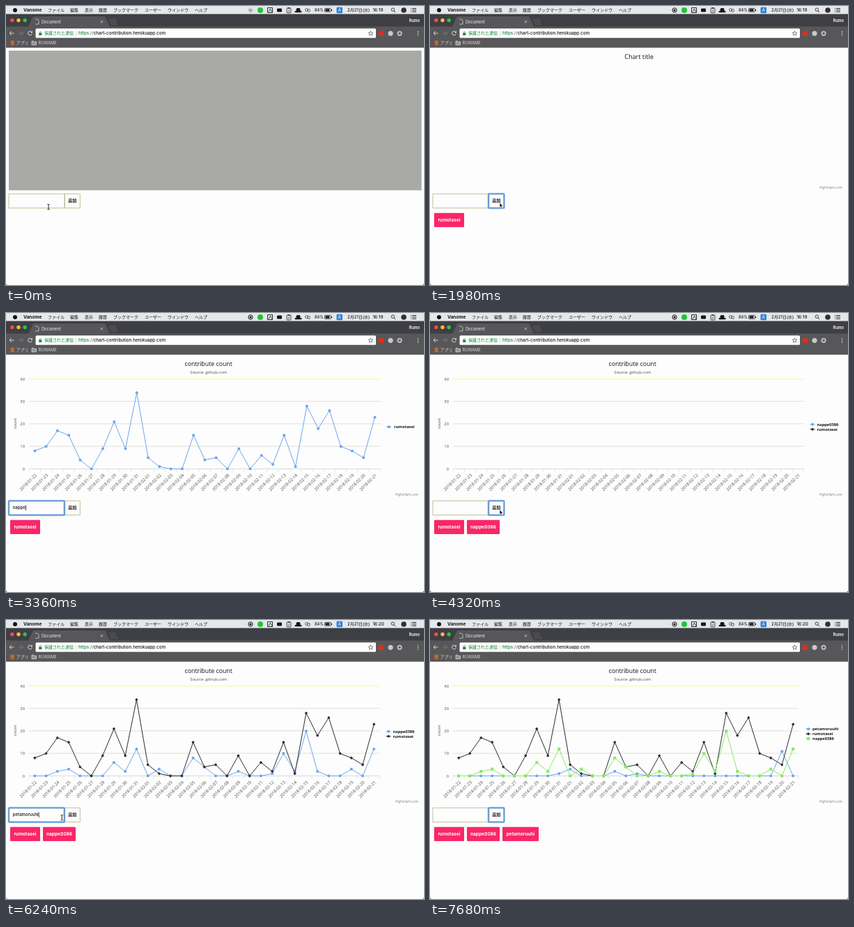
An HTML page with a canvas that plays this animation: 600x400 px, repeating every 7740 ms.

```html
<!DOCTYPE html>
<html lang="ja">
<head>
<meta charset="utf-8">
<title>Document</title>
<style>
html, body { margin: 0; width: 100%; height: 100%; overflow: hidden; background: #fdfdfd; }
canvas { display: block; width: 600px; height: 400px; }
</style>
</head>
<body>
<canvas id="stage" width="600" height="400"></canvas>
<script>
const c = document.getElementById('stage').getContext('2d');
const LOOP = 7740;
const UI = 'Inter, "Noto Sans CJK JP", "Noto Sans CJK", sans-serif';
const PLOT = '"Open Sans", "Noto Sans", sans-serif';
const INK = '#141416', SOFT = '#4a4a42', PAGE = '#fdfdfd', STRIP = '#3e3e45', BAR = '#57575a', PALE = '#e2e2e2';
const EDGE = '#b9b98c';

const users = {
  a: { name: 'rumotasei', data: [8,10,17,15,4,0,9,21,9,34,5,1,0,0,15,4,5,0,9,0,6,2,15,1,28,18,26,10,8,5,23] },
  b: { name: 'nappe0386', data: [0,0,2,3,0,0,0,6,2,12,0,3,0,0,8,4,0,0,2,0,0,1,10,2,20,2,0,0,3,0,12] },
  c: { name: 'petamoruuhi', data: Array.from({ length: 31 }, (_, i) => ({ 9: 1, 10: 3, 14: 2, 16: 1, 29: 11 })[i] || 0) }
};
const tags = [
  { user: 'a', at: 1860, x: 6, w: 43 },
  { user: 'b', at: 4080, x: 53, w: 47 },
  { user: 'c', at: 6420, x: 104, w: 52 }
];
const charts = [
  { at: 2400, order: 'a', step: 16.27, key: 549.5, label: 557 },
  { at: 4300, order: 'ba', step: 16.23, key: 549, label: 555.5 },
  { at: 6808, order: 'cab', step: 16, key: 543, label: 549 }
];
// focus: when the field is clicked; type: first key; rate: ms per key
const entries = [
  { focus: 480, type: 800, rate: 80, end: 1860, user: 'a' },
  { focus: 2700, type: 2900, rate: 85, end: 4080, user: 'b' },
  { focus: 4840, type: 5000, rate: 85, end: 6420, user: 'c' }
];
// pointer moves: start, end, from, to; it hides between them while typing
const moves = [
  [0, 420, 61, 288, 58, 283], [420, 800, 58, 283, 58, 283],
  [1560, 1800, 58, 283, 100, 282], [1800, 2300, 100, 282, 100, 282],
  [2300, 2650, 100, 282, 55, 284], [2650, 2900, 55, 284, 55, 284],
  [3740, 4020, 55, 284, 100, 282], [4020, 4500, 100, 282, 100, 282],
  [4500, 4800, 100, 282, 54.5, 285], [4800, 5000, 54.5, 285, 54.5, 285],
  [6100, 6360, 54.5, 285, 100, 282], [6360, 6600, 100, 282, 100, 282],
  [6600, 7060, 100, 282, 216.5, 333], [7060, 7300, 216.5, 333, 216.5, 333]
];
const types = ['#6ea5ea', '#2b2b31', '#8be866'];
const shapes = ['circle', 'diamond', 'square'];

const ease = p => 0.5 - 0.5 * Math.cos(Math.PI * Math.min(1, Math.max(0, p)));

function text(s, x, y, size, color, o = {}) {
  c.font = `${o.weight || 400} ${size}px ${o.font || UI}`;
  c.textAlign = o.align || 'left';
  c.fillStyle = color;
  c.fillText(s, x, y + size * 0.36);
  return c.measureText(s).width;
}
function rect(x, y, w, h, color, r = 0) {
  c.fillStyle = color;
  c.beginPath();
  c.roundRect(x, y, w, h, r);
  c.fill();
}
function box(x, y, w, h, color, line = 1, r = 0) {
  c.strokeStyle = color;
  c.lineWidth = line;
  c.beginPath();
  c.roundRect(x, y, w, h, r);
  c.stroke();
}
function dot(x, y, r, color) {
  c.fillStyle = color;
  c.beginPath();
  c.arc(x, y, r, 0, 7);
  c.fill();
}
function ring(x, y, r, color, line = 0.8, from = 0, to = 7) {
  c.strokeStyle = color;
  c.lineWidth = line;
  c.beginPath();
  c.arc(x, y, r, from, to);
  c.stroke();
}
function path(pts, color, line, fill) {
  c.beginPath();
  for (let i = 0; i < pts.length; i += 2) c.lineTo(pts[i], pts[i + 1]);
  if (fill) { c.closePath(); c.fillStyle = fill; c.fill(); }
  if (color) { c.strokeStyle = color; c.lineWidth = line; c.stroke(); }
}

function menuBar(t) {
  rect(0, 0, 600, 11.5, '#e5e8ea');
  dot(13, 6, 3, INK);
  text('Vanome', 25, 5.7, 6.6, INK, { weight: 700 });
  const items = [['ファイル', 60], ['編集', 92], ['表示', 113], ['履歴', 133], ['ブックマーク', 154],
    ['ユーザー', 199], ['ウインドウ', 232], ['ヘルプ', 271]];
  const mid = { weight: 500 };
  for (const [s, x] of items) text(s, x, 5.7, 6, INK, mid);

  const live = t >= 60;
  ring(351, 6, 3.2, live ? INK : '#b8b8b6', 1);
  dot(351, 6, 1.6, live ? INK : '#777774');
  dot(365, 6, 4, '#1fc43a');
  box(375.5, 2.5, 7, 7, INK, 0.9);
  path([377, 8.5, 379.5, 4, 381.5, 8.5], INK, 0.8);
  rect(389, 3.5, 7, 5, INK, 1);
  box(403, 3, 6, 7, '#3c3c40', 0.9, 0.8);
  rect(404.5, 2, 3, 1.8, '#3c3c40');
  path([404.5, 6, 407.5, 6], '#3c3c40', 0.7);
  path([404.5, 8, 407.5, 8], '#3c3c40', 0.7);
  rect(416.5, 3, 6, 5, INK, 2);
  rect(414.5, 7, 10, 2.2, INK, 1);
  ring(431.5, 5.5, 2, '#3c3c40');
  ring(434.5, 6.5, 2, '#3c3c40');
  text('84%', 443, 5.9, 5.6, INK, mid);
  box(457.5, 3.4, 9, 5, INK, 0.7, 0.8);
  rect(458.5, 4.3, 6, 3.2, INK);
  rect(467.2, 5, 1, 2, INK);
  rect(474.5, 1.8, 8.5, 8.5, '#2f7fdc', 1);
  text('A', 478.7, 6, 6.4, '#fff', { align: 'center' });
  text('2月21日(水)', 490, 5.7, 6, INK, mid);
  text(t < 5900 ? '16:19' : '16:20', 526.5, 5.7, 6.2, INK, mid);
  ring(555.3, 5.2, 2.2, INK);
  path([557, 7, 559, 9.2], INK, 0.9);
  dot(571, 6, 3.8, '#30303c');
  for (let i = 0; i < 3; i++) {
    path([581, 3.5 + i * 2.4, 582, 3.5 + i * 2.4], INK, 0.9);
    path([583, 3.5 + i * 2.4, 589, 3.5 + i * 2.4], INK, 0.9);
  }
}

function browser() {
  rect(0, 11.5, 600, 18.5, STRIP);
  rect(0, 29.5, 600, 30.3, BAR);
  ['#fb4a3f', '#fdbd2f', '#2fc541'].forEach((k, i) => dot(8.8 + i * 9.2, 20.5, 2.7, k));
  path([32, 30, 38, 16, 40, 15, 141, 15, 143, 16, 149, 30], null, 0, BAR);
  path([148, 18.5, 157, 18.5, 160, 27, 151, 27], '#57575c', 0.6, '#4a4a50');
  path([42, 19, 45.2, 19, 47, 20.8, 47, 26, 42, 26], PALE, 0.7);
  text('Document', 51, 22.5, 5.7, '#f4f4f4');
  path([135.8, 21, 139, 24.2], PALE, 0.7);
  path([139, 21, 135.8, 24.2], PALE, 0.7);
  text('Rumo', 594, 21, 5.6, '#fff', { weight: 600, align: 'right' });

  path([11.5, 39, 5, 39], PALE, 0.9);
  path([8, 36, 5, 39, 8, 42], PALE, 0.9);
  path([18, 39, 24.5, 39], '#7e7e80', 0.9);
  path([21.5, 36, 24.5, 39, 21.5, 42], '#7e7e80', 0.9);
  ring(34.5, 39, 2.9, PALE, 0.9, 0.3, 5.5);
  path([37.8, 35.6, 37.8, 38.4, 35, 38.4], null, 0, PALE);

  rect(42.5, 32.3, 488.5, 13.4, PAGE, 1.5);
  rect(47.2, 38.4, 4.2, 3.6, '#16873a', 0.4);
  ring(49.3, 38.2, 1.4, '#16873a', 0.7, Math.PI, Math.PI * 2);
  text('保護された通信', 55, 39.2, 6, '#16873a', { weight: 500 });
  path([100.5, 35.5, 100.5, 43], '#c4c4c2', 0.6);
  let x = 104;
  for (const [s, color] of [['https', '#16873a'], ['://', '#6c6c6c'], ['chart-contribution.herokuapp.com', INK]])
    x += text(s, x, 39.2, 6.25, color, { weight: 500 });
  const star = [];
  for (let i = 0; i <= 10; i++) {
    const r = i % 2 ? 1.5 : 3.5, a = i * Math.PI / 5 - Math.PI / 2;
    star.push(523.5 + r * Math.cos(a), 39.3 + r * Math.sin(a));
  }
  path(star, '#4c4c4c', 0.7);
  dot(538.5, 39.3, 4, '#d8301e');
  dot(552, 39.3, 3.6, '#c8c8c8');
  dot(565, 39.3, 3.6, '#bbbbbb');
  dot(565, 39.3, 1.5, BAR);
  for (let i = 0; i < 3; i++) dot(591.5, 36.7 + i * 2.6, 0.75, PALE);

  const apps = ['#e8503a', '#d8a83a', '#d86a3a'];
  for (let i = 0; i < 9; i++) rect(6 + i % 3 * 2.3, 49.8 + Math.floor(i / 3) * 2.3, 1.6, 1.6, apps[i % 3]);
  text('アプリ', 14.5, 53, 6, '#d8d8d8');
  path([37, 50.3, 39.5, 50.3, 40.3, 51.3, 43.5, 51.3, 43.5, 55.8, 37, 55.8], PALE, 0.7, '#929292');
  text('RUWAME', 46.5, 53, 5.8, '#d8d8d8');
}

function marker(kind, x, y, r = 2) {
  const color = types[kind];
  if (shapes[kind] === 'circle') dot(x, y, r, color);
  else if (shapes[kind] === 'square') rect(x - r, y - r, r * 2, r * 2, color);
  else path([x, y - r - 0.2, x + r + 0.2, y, x, y + r + 0.2, x - r - 0.2, y], null, 0, color);
}
function clipTo(right, draw) {
  c.save();
  c.beginPath();
  c.rect(0, 60, right, 200);
  c.clip();
  draw();
  c.restore();
}

function credit() {
  text('Highcharts.com', 592, 260, 4.5, '#7c7c6c', { font: PLOT, align: 'right' });
}

function chart(g, t) {
  const left = 33.2, width = g.step * 31, base = 223.5;
  const px = i => left + g.step * (i + 0.5);
  const py = v => base - v * 3.215;
  const mid = { font: PLOT, align: 'center' };
  text('contribute count', 290.7, 73, 8.8, INK, mid);
  text('Source: github.com', 290.7, 85, 5.9, SOFT, mid);

  for (let v = 0; v <= 40; v += 10) {
    text(v, 27, py(v), 5.8, SOFT, { font: PLOT, align: 'right' });
    if (v) path([left, py(v) - 0.3, left + width, py(v) - 0.3], v === 40 ? '#f8f8a4' : '#dfdfd6', 1);
  }
  path([left, base, left + width, base], '#d0d3d4', 0.8);
  for (let i = 0; i <= 31; i++) path([left + i * g.step, base, left + i * g.step, base + 4.5], '#d6d9da', 0.6);

  c.save();
  c.translate(13, 158.5);
  c.rotate(-Math.PI / 2);
  text('count', 0, 0, 5.8, SOFT, mid);
  c.restore();

  for (let i = 0; i < 31; i++) {
    const day = new Date(Date.UTC(2018, 0, 22 + i)).toISOString().slice(0, 10);
    c.save();
    c.translate(px(i) + 1.6, 231.4);
    c.rotate(-Math.PI / 4);
    text(day, 0, 0, 6.1, SOFT, { font: PLOT, align: 'right' });
    c.restore();
  }

  // the marker clip runs slightly ahead of the line clip
  const p = ease((t - g.at) / 500);
  [...g.order].forEach((id, k) => {
    const data = users[id].data;
    c.lineJoin = 'round';
    clipTo(left + p * width, () => path(data.flatMap((v, i) => [px(i), py(v)]), types[k], 1));
    clipTo(left + p * (width + 46), () => data.forEach((v, i) => marker(k, px(i), py(v))));
  });
  c.lineJoin = 'miter';

  [...g.order].forEach((id, k) => {
    const y = 163.2 + (k - (g.order.length - 1) / 2) * 7;
    path([g.key - 3.5, y, g.key + 3.5, y], types[k], 1);
    marker(k, g.key, y);
    text(users[id].name, g.label, y, 5.7, INK, { font: PLOT, weight: 700 });
  });
  credit();
}

function focusRing(x, y, w, h) {
  box(x, y, w, h, 'rgba(95,150,225,.45)', 3, 1);
  box(x, y, w, h, '#4f8bd6', 1.2, 1);
}

function form(t) {
  const entry = entries.find(e => t >= e.focus && t < e.end);
  box(4, 269.3, 80, 20.4, EDGE, 0.9);
  box(84.3, 269.3, 22, 20.4, EDGE, 0.9);
  text('追加', 95.2, 279.3, 6, INK, { align: 'center', weight: 700 });
  if (entry) {
    focusRing(4, 269.3, 79.8, 20.4);
    const n = Math.max(0, Math.floor((t - entry.type) / entry.rate));
    const w = text(users[entry.user].name.slice(0, n), 9.7, 279.3, 6.1, INK, { weight: 500 });
    rect(9.8 + w, 275.5, 0.8, 7.5, INK);
  } else if (t >= tags[0].at) {
    focusRing(84, 269.3, 22.4, 20.4);
  }
  for (const g of tags) {
    if (t < g.at) continue;
    rect(g.x, 296.8, g.w, 20.2, '#f92768', 1);
    text(users[g.user].name, g.x + g.w / 2, 306.8, 6.5, '#fff', { weight: 700, align: 'center' });
  }
}

function pointer(t) {
  const m = moves.find(v => t >= v[0] && t < v[1]);
  if (!m) return;
  const p = ease((t - m[0]) / (m[1] - m[0]));
  const x = m[2] + (m[4] - m[2]) * p, y = m[3] + (m[5] - m[3]) * p;
  if (x > 4 && x < 84 && y > 269 && y < 290) {
    path([x, y - 3.4, x, y + 3.4], INK, 0.9);
    for (const s of [-1, 1]) path([x - 1.8, y + s * 4, x, y + s * 3.2, x + 1.8, y + s * 4], INK, 0.8);
  } else {
    path([x, y, x, y + 6.8, x + 1.5, y + 5.4, x + 2.6, y + 8, x + 3.7, y + 7.5, x + 2.6, y + 5, x + 4.7, y + 4.9],
      '#fff', 0.6, '#111');
  }
}

function draw(t) {
  rect(0, 0, 600, 400, '#222');
  rect(0, 0, 600, 400, PAGE, [0, 0, 2.5, 2.5]);
  menuBar(t);
  browser();
  const g = charts.filter(v => t >= v.at).pop();
  if (g) chart(g, t);
  else if (t >= tags[0].at) {
    text('Chart title', 300, 73, 9, INK, { font: PLOT, align: 'center' });
    credit();
  } else rect(4, 64, 592.5, 200.3, '#a9a9a8');
  form(t);
  pointer(t);
}

const start = performance.now();
function tick() {
  draw((performance.now() - start) % LOOP);
  requestAnimationFrame(tick);
}
tick();
</script>
</body>
</html>
```
